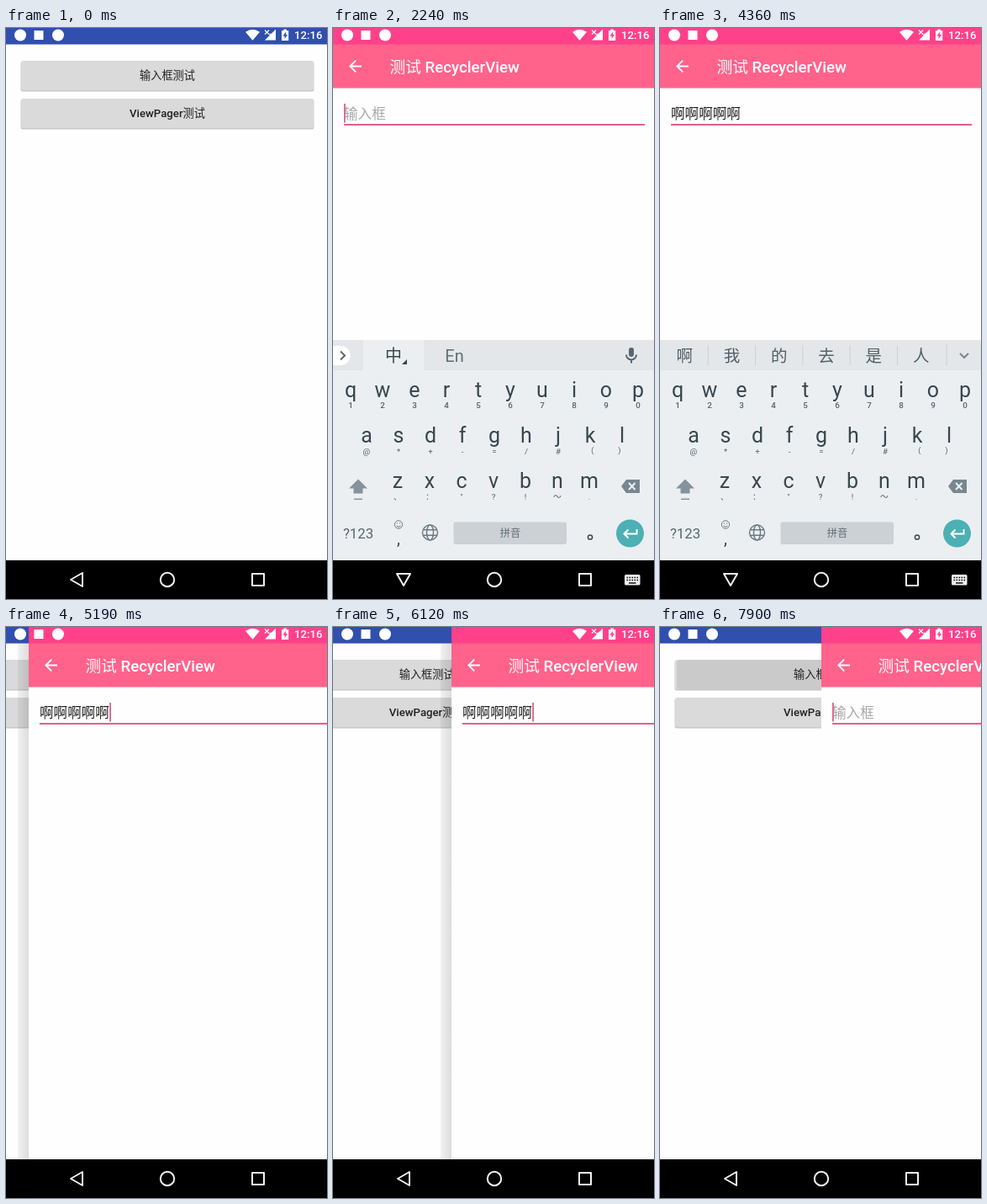
Write an HTML page that moves like this. It is 382 px wide and 679 px high and loops after 8000 ms.

```html
<!DOCTYPE html>
<html lang="zh-CN">
<head>
<meta charset="utf-8">
<title>Input box test</title>
<style>
  html, body { margin: 0; width: 100%; height: 100%; overflow: hidden; background: #fefefe; }
  svg { display: block; width: 382px; height: 679px; overflow: hidden; }
  text { font-family: Roboto, "Noto Sans CJK SC", "Noto Sans CJK", sans-serif; white-space: pre; }
  .mid { text-anchor: middle; }
  .med { font-weight: 500; }
  .reg { font-weight: 400; }
  .line { fill: none; stroke-width: 2; }
</style>
</head>
<body>
<svg viewBox="0 0 382 679">
  <defs>
    <linearGradient id="shade">
      <stop offset="0" stop-opacity=".05"/>
      <stop offset="1" stop-opacity=".13"/>
    </linearGradient>
  </defs>

  <rect width="382" height="679" fill="#fefefe"/>
  <g id="home" font-size="13.2" fill="#212121">
    <g id="buttons"></g>
    <text class="mid" x="192" y="61.3">输入框测试</text>
    <text class="mid med" x="192" y="106.3">ViewPager<tspan class="reg">测试</tspan></text>
  </g>
  <rect width="382" height="19.5" fill="#304fae"/>

  <g id="page">
    <rect id="shadow" x="-13" y="19.5" width="13" height="614" fill="url(#shade)"/>
    <rect width="382" height="640" fill="#fefefe"/>
    <rect width="382" height="20" fill="#ff418a"/>
    <rect y="19.5" width="382" height="52" fill="#ff628b"/>
    <path transform="translate(15.3 34.3) scale(.935)" fill="#fff"
      d="M20 11H7.83l5.59-5.59L12 4l-8 8 8 8 1.41-1.41L7.83 13H20z"/>
    <text class="med" x="67.5" y="52.5" font-size="18.7" fill="#fff"><tspan class="reg">测试</tspan> RecyclerView</text>
    <text id="field" x="13" y="107.8" font-size="16.6"></text>
    <rect x="13" y="114" width="358" height="2" fill="#e45f8e"/>
    <rect id="cursor" y="90" width="1.8" height="22.5" fill="#d9628f"/>
  </g>

  <g id="status" fill="#fff">
    <circle cx="17" cy="8.5" r="7"/>
    <rect x="33.5" y="3" width="11" height="11"/>
    <circle cx="62" cy="8.5" r="7"/>
    <path d="M285 4.8Q293.5-1.5 302 4.8L293.5 14.8Z"/>
    <path d="M321 1.5V14.5H308L313.5 9V7L316 6.5Z"/>
    <path d="M308 2.5l5 5m0-5l-5 5" stroke="#fff" stroke-width="1.2"/>
    <path fill-rule="evenodd" d="M328 3h2.3V1.5h3.6V3h2.3v12H328zM333 4.5l-3.4 5h2V13l3.4-5h-2z"/>
    <text class="med" x="343" y="13.3" font-size="13.2">12:16</text>
  </g>

  <g id="keyboard">
    <rect y="371" width="382" height="300" fill="#eceff2"/>
    <rect y="371" width="382" height="36" fill="#e4e7e9"/>
    <g id="idle">
      <rect x="36" y="371" width="72" height="36" fill="#eceff2"/>
      <path d="M0 378h9a11.5 11.5 0 0 1 0 23H0z" fill="#fff"/>
      <path d="M9 384.5l5 5-5 5" class="line" stroke="#59666d"/>
      <text class="mid" x="72" y="397" font-size="20" fill="#37474f">中</text>
      <path d="M88 394v6h-6z" fill="#37474f"/>
      <text class="mid" x="144.5" y="396.5" font-size="20" fill="#5f7079">En</text>
      <rect x="352" y="380" width="6" height="11" rx="3" fill="#59666d"/>
      <path d="M349 388.5a6 6 0 0 0 12 0M355 394.5v4" class="line" stroke="#59666d" stroke-width="1.5"/>
    </g>
    <g id="strip">
      <rect id="pick" y="371" width="113" height="36" fill="#d0d5d8"/>
      <g id="words" font-size="19.5" fill="#4f5f68"></g>
      <path d="M341 376v26" stroke="#cbd0d3"/>
      <path d="M357 387l5 5 5-5" class="line" stroke="#78868e"/>
    </g>
    <g id="keys"></g>
    <g id="shift" fill="#85939a">
      <path d="M30 536.5l11 11h-5.5v6h-11v-6H19z"/>
      <rect x="25" y="559.5" width="10" height="1.5"/>
    </g>
    <text id="split" class="mid" x="30" y="551" font-size="14" fill="#546770">分词</text>
    <path d="M343 545l6-8h16v16h-16z" fill="#78878f"/>
    <path d="M352 541l7.5 8m0-8l-7.5 8" class="line" stroke="#eceff2"/>
    <text class="mid" x="30" y="606.5" font-size="16.8" fill="#546770">?123</text>
    <g fill="none" stroke="#6b7a82">
      <circle cx="78" cy="590.5" r="4.7"/>
      <path d="M75.5 592q2.5 2.6 5 0M76.3 588.5v1.2M79.7 588.5v1.2"/>
      <g stroke-width="1.4">
        <circle cx="115.5" cy="600" r="9"/>
        <ellipse cx="115.5" cy="600" rx="4" ry="9"/>
        <path d="M107.5 596.8h16m-16 6.4h16"/>
      </g>
      <circle cx="306" cy="605.5" r="2.6" stroke="#37474f" stroke-width="1.5"/>
    </g>
    <text class="mid" x="78" y="614" font-size="20" fill="#37474f">,</text>
    <rect x="143.5" y="587.5" width="134.5" height="26.5" rx="2" fill="#ccd1d6"/>
    <text class="mid" x="211" y="605.3" font-size="12.3" fill="#5f6d75">拼音</text>
    <circle cx="353.5" cy="601" r="16.5" fill="#4cb0b5"/>
    <path d="M361.5 596v5.5h-15m5-5l-5 5 5 5" class="line" stroke="#fff"/>
    <g id="popup">
      <rect x="19" y="463" width="41" height="51" rx="2" fill="#d9dee1"/>
      <rect x="19" y="408" width="41" height="56" rx="3" fill="#c3cacd"/>
      <rect x="19" y="407" width="41" height="56" rx="3" fill="#fbfcfc"/>
      <text class="mid" x="39.5" y="443" font-size="29" fill="#37474f">a</text>
    </g>
  </g>

  <rect y="633" width="382" height="46"/>
  <g class="line" stroke="#f2f2f2" stroke-linejoin="round">
    <path id="back" d="M77 656L91 648V664Z"/>
    <circle cx="192" cy="656" r="8.2"/>
    <rect x="293" y="649" width="14" height="14"/>
  </g>
  <g id="switcher">
    <rect x="347" y="650" width="18.5" height="12.5" rx="1.5" fill="#f2f2f2"/>
    <path d="M349.5 653.5h14m-14 3h14" stroke="#000" stroke-width="1.6" stroke-dasharray="1.6 1.4"/>
    <path d="M352 660h8.5" stroke="#000" stroke-width="1.4"/>
  </g>
</svg>

<script>
const LOOP = 8000, WIDTH = 382;
const el = id => document.getElementById(id);

function add(parent, tag, attrs, content = '') {
  const node = document.createElementNS('http://www.w3.org/2000/svg', tag);
  for (const key in attrs) node.setAttribute(key, attrs[key]);
  node.textContent = content;
  return parent.appendChild(node);
}

// The value of the last [time, value] step reached by t.
const at = (steps, t) => steps.reduce((v, s) => t >= s[0] ? s[1] : v, steps[0][1]);
const show = (id, on) => el(id).setAttribute('visibility', on ? 'visible' : 'hidden');
const move = (id, x, y) => el(id).setAttribute('transform', `translate(${x} ${y})`);

for (const y of [39, 84]) {
  add(el('buttons'), 'rect', { x: 17.5, y: y + 1, width: 349, height: 35.5, rx: 2, fill: '#c8c8c8' });
  add(el('buttons'), 'rect', { x: 18, y, width: 348, height: 35, rx: 2, fill: '#dadada' });
}
const ripple = add(el('buttons'), 'rect', { x: 20, y: 39, width: 346, height: 35, rx: 4, fill: '#cacaca' });

const rows = [
  ['qwertyuiop', '1234567890', 21, 438.5],
  ['asdfghjkl', '@*+-=/#（）', 40, 492.8],
  ['zxcvbnm', '、："?!～.', 77, 546.8]
];
rows.forEach(([letters, hints, x0, y], row) => [...letters].forEach((letter, i) => {
  const x = x0 + i * 38;
  add(el('keys'), 'text', { class: 'mid', x, y, 'font-size': 25, fill: '#37474f' }, letter);
  add(el('keys'), 'text', {
    class: row ? 'mid' : 'mid med', x, y: y + 13.7, 'font-size': 9.8, fill: '#52626b'
  }, hints[i]);
}));

const pageX = [
  [0, 382], [345, 192], [460, 0], [5075, 6], [5190, 27], [5310, 70], [5420, 128], [5540, 180],
  [5660, 215], [5770, 238], [5890, 234], [6010, 198], [6120, 141], [6240, 80], [6360, 34],
  [6480, 46], [6590, 112], [6710, 210], [6830, 300], [6950, 358], [7060, 382], [7900, 192]
];
const keyboardY = [
  [0, 262], [1650, 150], [1770, 50], [1890, 12], [2000, 0], [4960, 140], [5075, 262]
];
const letterCount = [[0, 0], [2840, 1], [3070, 2], [3190, 3], [3300, 4], [3420, 5], [3890, 0]];
const popupOn = [[0, 0], [2720, 1], [2840, 0], [2950, 1], [3540, 0]];
const cursorOn = [
  [0, 1], [810, 0], [1290, 1], [1770, 0], [2240, 1], [2720, 0], [2840, 1], [4360, 0], [4840, 1]
];

let shownWords = '';
function setWords(list, wide) {
  const key = list.join();
  if (key === shownWords) return;
  shownWords = key;
  const box = el('words');
  box.textContent = '';
  let x = 1;
  for (const word of list) {
    const w = wide ? word.length * 19.5 + 16 : 56.3;
    if (x + w > 342) break;
    add(box, 'text', { class: 'mid', x: x + w / 2, y: 396.7 }, word);
    x += w;
    if (x < 335) add(box, 'path', { d: `M${x} 377v24`, stroke: '#cbd0d3' });
  }
}

function draw(t) {
  const x = at(pageX, t);
  const dragging = t >= 5075 && t < 7060;
  move('page', x, 0);
  move('home', dragging ? (x - WIDTH) / 3 : 0, 0);
  show('shadow', dragging);
  ripple.setAttribute('visibility', (t >= 230 && t < 460) || t >= 7660 ? 'visible' : 'hidden');
  ripple.setAttribute('fill', t >= 7660 && t < 7780 ? '#d0d0d0' : '#cacaca');

  const typed = at(letterCount, t);
  const done = t >= 3890 && t < 7060;
  const field = el('field');
  const value = done ? '啊'.repeat(5) : typed ? 'a'.repeat(typed) : '输入框';
  if (field.textContent !== value) field.textContent = value;
  field.setAttribute('fill', done || typed ? '#212121' : '#a9a9a9');
  field.setAttribute('text-decoration', typed ? 'underline' : 'none');
  el('cursor').setAttribute('x', done ? 96.2 : 13 + typed * 9.05);
  show('cursor', at(cursorOn, t));

  move('keyboard', 0, at(keyboardY, t));
  show('idle', !done && !typed);
  show('strip', done || typed);
  show('pick', t >= 3770 && t < 3890);
  show('popup', at(popupOn, t));
  show('shift', !typed);
  show('split', typed);
  if (done) setWords([...'啊我的去是人']);
  else if (typed) {
    const runs = Array.from({ length: typed }, (_, i) => '啊'.repeat(typed - i));
    setWords([...runs, '阿', '呵', '吖', '锕'], true);
  }

  const open = t >= 1650 && t < 4960;
  el('back').setAttribute('transform', open ? 'rotate(-90 84 656)' : '');
  show('switcher', open);
}

function tick() {
  draw(performance.now() % LOOP);
  requestAnimationFrame(tick);
}
tick();
</script>
</body>
</html>
```
